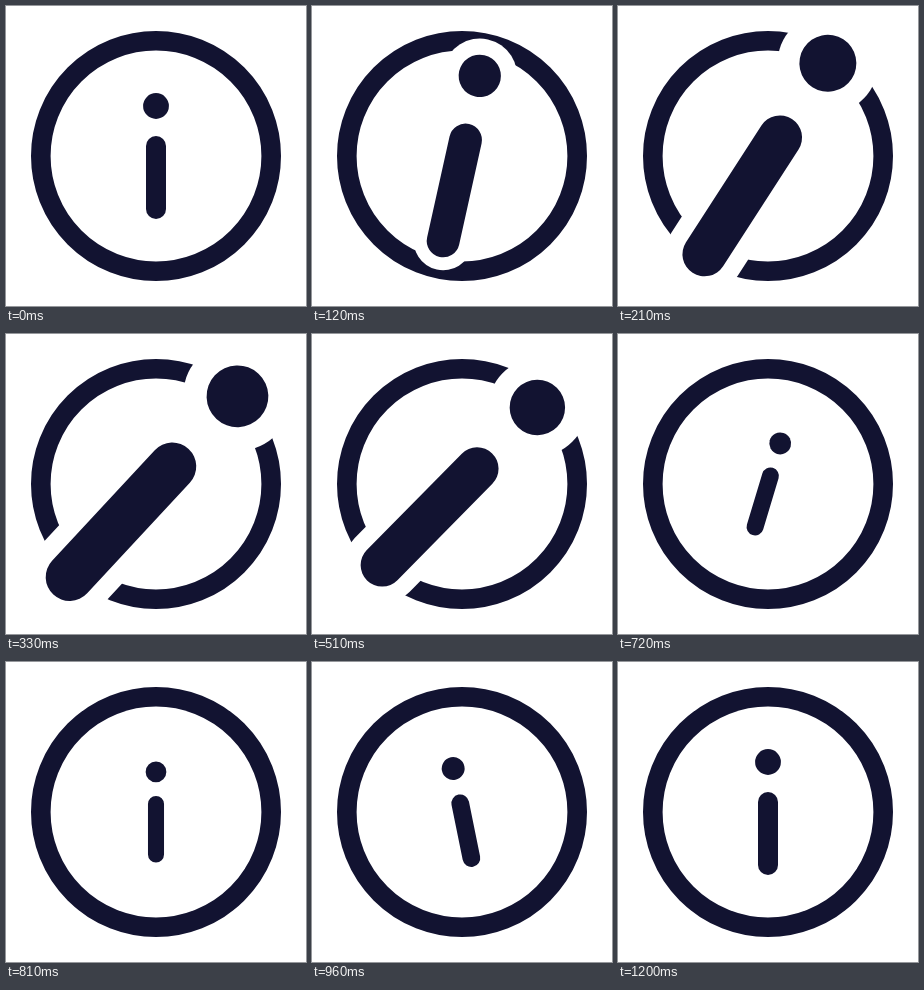
Write an HTML page that moves like this. It is 300 px wide and 300 px high and loops after 3230 ms.

```html
<!DOCTYPE html>
<html lang="en">
<head>
<meta charset="utf-8">
<title>Info icon</title>
<style>
  html, body { margin: 0; height: 100%; overflow: hidden; background: #fff; }
  svg { display: block; width: 100%; height: 100%; }
  line { stroke-linecap: round; }
</style>
</head>
<body>
<svg viewBox="-150 -150 300 300">
  <circle r="115.2" fill="none" stroke="#121331" stroke-width="19.6"/>
  <g id="info">
    <g fill="#fff" stroke="#fff">
      <circle cy="-50" r="22.8" stroke="none"/>
      <line y1="-10" y2="53" stroke-width="35.8"/>
    </g>
    <g fill="#121331" stroke="#121331">
      <circle cy="-50" r="12.9" stroke="none"/>
      <line y1="-10" y2="53" stroke-width="20"/>
    </g>
  </g>
</svg>
<script>
const LOOP = 3230, STEP = 30;
const info = document.getElementById('info');

// Cubic ease with control points (x1, 0) and (x2, 1)
function ease(x, x1, x2) {
  let lo = 0, hi = 1;
  for (let i = 0; i < 24; i++) {
    const t = (lo + hi) / 2, u = 1 - t;
    if (3 * u * u * t * x1 + 3 * u * t * t * x2 + t ** 3 < x) lo = t;
    else hi = t;
  }
  return lo * lo * (3 - 2 * lo);
}

// Keys: [time, value, x1, x2], the curve leading into that key
const scaleKeys = [
  [0, 1], [360, 2.4, .4, .2], [420, 2.4, .4, .6],
  [780, .8, .42, .4], [1170, 1, .42, .58]
];
const angleKeys = [
  [0, 0], [450, 45, .4, .2], [480, 45, .4, .6],
  [960, -11.5, .42, .58], [1200, 0, .42, .58]
];

function valueAt(keys, t) {
  const i = keys.findIndex(k => k[0] > t);
  if (i < 0) return keys[keys.length - 1][1];
  const [t0, v0] = keys[i - 1], [t1, v1, x1, x2] = keys[i];
  return v0 + (v1 - v0) * ease((t - t0) / (t1 - t0), x1, x2);
}

const start = performance.now();
function draw() {
  const now = (performance.now() - start) % LOOP;
  const t = Math.floor(now / STEP) * STEP;
  info.setAttribute('transform',
    `rotate(${valueAt(angleKeys, t)}) scale(${valueAt(scaleKeys, t)})`);
  requestAnimationFrame(draw);
}
draw();
</script>
</body>
</html>
```
